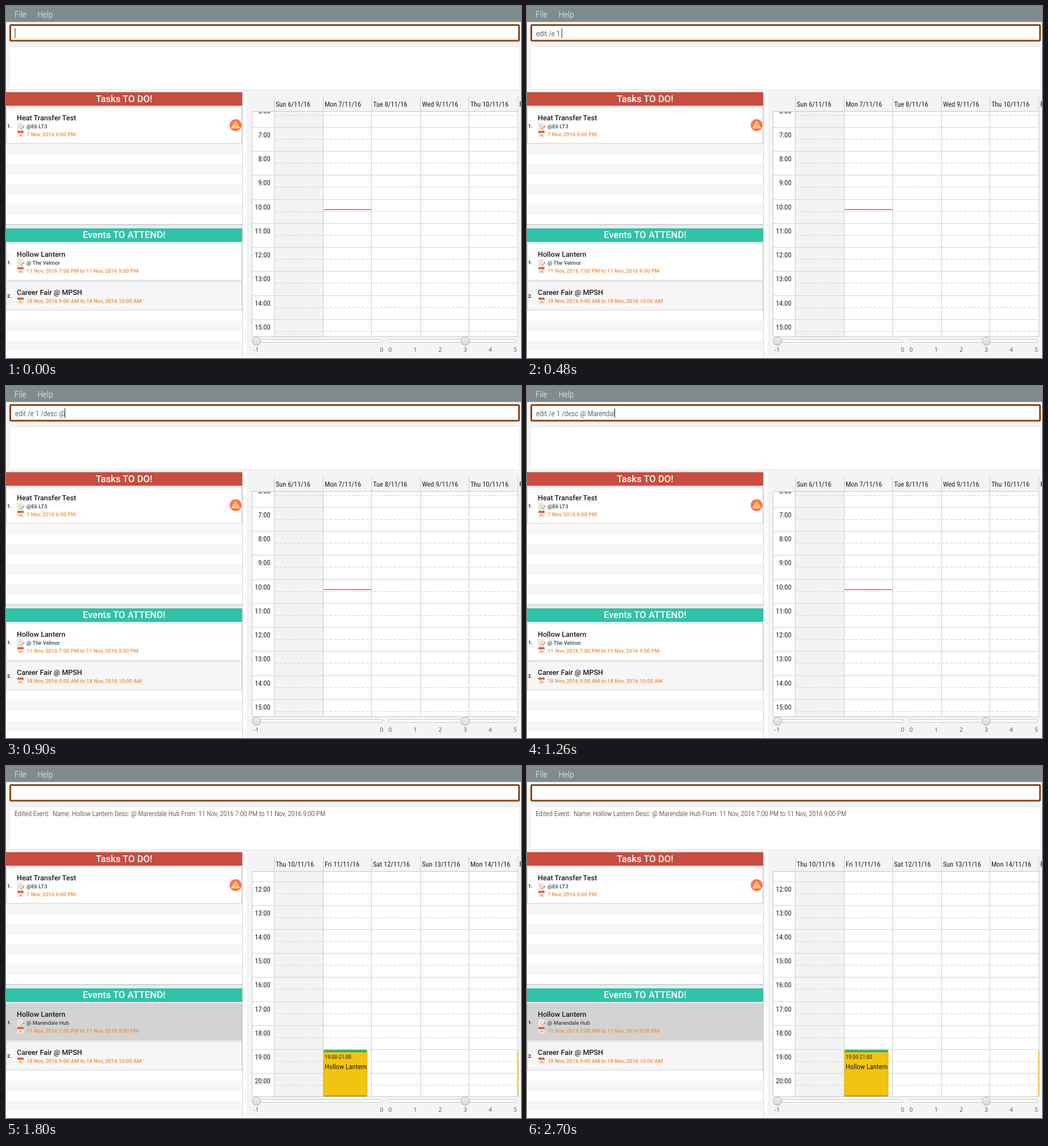
Write an HTML page that moves like this. It is 905 px wide and 619 px high and loops after 3000 ms.

```html
<!DOCTYPE html>
<html lang="en">
<head>
<meta charset="utf-8">
<title>Task planner</title>
<style>
html, body { margin: 0; width: 100%; height: 100%; overflow: hidden; background: #f4f4f4; }
svg { display: block; }
text { font-family: Roboto, sans-serif; white-space: pre; text-rendering: geometricPrecision; }
.cond { font-family: "Roboto Condensed", Roboto, sans-serif; font-stretch: 75%; }
</style>
</head>
<body>
<svg id="stage" width="905" height="619" viewBox="0 0 905 619">
  <defs>
    <clipPath id="gridClip"><rect x="432" y="186" width="469" height="395"/></clipPath>
    <linearGradient id="knob" x2="0" y2="1">
      <stop offset="0" stop-color="#f0f0f0"/><stop offset="1" stop-color="#d8d8d8"/>
    </linearGradient>
  </defs>
</svg>
<script>
const LOOP = 3000, STEP = 60;
const FILM = "Hollow Lantern", MALL = "Marendale Hub";
const SPAN = "11 Nov, 2016 7:00 PM to 11 Nov, 2016 9:00 PM";
const COMMAND = `edit /e 1 /desc @ ${MALL}`;
const stage = document.getElementById("stage");

function el(tag, attrs, parent = stage) {
  const node = document.createElementNS("http://www.w3.org/2000/svg", tag);
  for (const k in attrs) node.setAttribute(k, attrs[k]);
  return parent.appendChild(node);
}
const group = (parent, attrs = {}) => el("g", attrs, parent);
const rect = (x, y, width, height, fill, parent, more = {}) =>
  el("rect", { x, y, width, height, fill, ...more }, parent);
const line = (x1, y1, x2, y2, stroke, parent, more = {}) =>
  el("line", { x1, y1, x2, y2, stroke, ...more }, parent);
const path = (d, fill, parent, more = {}) => el("path", { d, fill, ...more }, parent);

function label(str, x, y, size, fill, parent, more = {}) {
  const node = el("text", { x, y, "font-size": size, fill, ...more }, parent);
  node.textContent = str;
  return node;
}

// Narrow the face when no condensed cut is available.
function narrowScale() {
  const sample = "Sun 6/11/16 10:00";
  const a = label(sample, 0, 0, 100, "none"), b = label(sample, 0, 0, 100, "none", stage, { class: "cond" });
  const ratio = b.getComputedTextLength() / a.getComputedTextLength();
  a.remove();
  b.remove();
  return ratio > 0.95 ? 0.875 : 1;
}
const narrow = narrowScale();

function cond(str, x, y, size, fill, parent, more = {}) {
  return label(str, 0, 0, size, fill, parent,
    { class: "cond", transform: `translate(${x} ${y}) scale(${narrow} 1)`, ...more });
}

function noteIcon(y, parent) {
  const g = group(parent, { transform: `translate(20 ${y})` });
  path("M0 .5H8L10.5 3V12.5H0Z", "#f1ede4", g, { stroke: "#d9d5cc", "stroke-width": .7 });
  path("M2 4H8M2 6.5H8M2 9H6", "none", g, { stroke: "#c5c2ba", "stroke-width": .7 });
  path("M5.5 11.5L11.5 6.5", "none", g, { stroke: "#e9a23b", "stroke-width": 1.6 });
  path("M10.7 7.2L12 6", "none", g, { stroke: "#d9483b", "stroke-width": 1.6 });
}

function calendarIcon(y, parent) {
  const g = group(parent, { transform: `translate(20 ${y})` });
  rect(0, 1, 11, 11, "#f3e8d0", g, { rx: 1 });
  path("M0 4.2V2Q0 1 1 1H10Q11 1 11 2V4.2Z", "#dc5347", g);
  path("M2.5 0V2.2M8.5 0V2.2", "none", g, { stroke: "#77737a", "stroke-width": 1 });
  path("M2 7H9M2 9.5H9", "none", g, { stroke: "#d9c49c", "stroke-width": 1, "stroke-dasharray": "1.5 1.2" });
  rect(4.5, 7.5, 2.2, 2, "#dc7a6a", g);
}

function card(y, height, num, numY, title, desc, date, fill) {
  const g = group(stage);
  const box = rect(.5, y + .5, 414, height, fill, g, { stroke: "#cfcfcf" });
  label(num + ".", 2, numY, 8.5, "#222", g, { "font-weight": 700 });
  label(title, 19, y + 23.7, 12.6, "#1c1c1c", g, { "font-weight": 500 });
  let place = null, base = y + 38.2;
  if (desc) {
    noteIcon(base - 10, g);
    place = label(desc, 36, base, 9.4, "#34495e", g, { "font-weight": 500 });
    base += 13.5;
  }
  calendarIcon(base - 10, g);
  label(date, 36, base, 9.4, "#ef8f36", g, { "font-weight": 500 });
  return { box, place };
}

function heading(str, y, fill) {
  rect(0, y, 415, 24, fill);
  label(str, 207.5, y + 17.3, 16.6, "#fff", stage, { "font-weight": 500, "text-anchor": "middle" });
}

function stripes(y, count) {
  for (let i = 0; i < count; i++) rect(1, y + i * 35.6, 413, 18, "#f6f6f7");
}

function slider(x, width, knobX, ticks) {
  rect(x + .5, 586.5, width, 5, "#fafafa", stage, { rx: 2.5, stroke: "#cbcbcb" });
  el("circle", { cx: knobX, cy: 589.5, r: 7.3, fill: "url(#knob)", stroke: "#ababab" });
  for (const [str, tx] of ticks) {
    label(str, tx, 608, 10.5, "#555", stage, { "text-anchor": "middle", style: "font-family:'Open Sans',sans-serif" });
  }
}

const colX = i => Math.floor(471.5 + 85.6 * i) + .5;

function calendar(days, firstHour, firstY) {
  const g = group(stage);
  days.forEach((d, i) => cond(d, colX(i) + 2.4, 177, 12.4, "#222", g));
  const grid = group(g, { "clip-path": "url(#gridClip)" });
  for (let i = -1; i < 10; i++) {
    const y = Math.floor(firstY + i * 42.22) + .5;
    line(433, y, 900, y, "#d4d4d4", grid);
    line(472, y + 21, 900, y + 21, "#d2d2d2", grid, { "stroke-dasharray": "5 3" });
    cond(firstHour + i + ":00", 464.5, y + 17, 12.4, "#222", grid, { "text-anchor": "end" });
  }
  return { g, grid };
}

// Menu, command box and message area
rect(0, 0, 905, 619, "#f4f4f4");
rect(0, 0, 905, 28, "#7f8c8d");
cond("File", 15, 19.5, 15.2, "#f2f4f4", stage, { "font-weight": 300 });
cond("Help", 55.5, 19.5, 15.2, "#f2f4f4", stage, { "font-weight": 300 });
rect(7.5, 33.5, 894, 27.5, "#fff", stage, { rx: 1.5, stroke: "#8b4513", "stroke-width": 3 });
const typed = cond("", 16, 52.5, 13.2, "#222", stage, { "font-weight": 300 });
const caret = line(0, 39, 0, 56.5, "#222", stage);
rect(6.5, 71.5, 896, 75, "#fff", stage, { rx: 2, stroke: "#ebebeb" });
const message = cond(`Edited Event:  Name: ${FILM} Desc: @ ${MALL} From: ${SPAN}`,
  15, 88, 12.35, "#222", stage, { "font-weight": 300 });

// Task and event lists
rect(0, 151, 416, 468, "#fff");
rect(416, 151, 7, 468, "#fdfdfd");
heading("Tasks TO DO!", 151.5, "#c94c3f");
stripes(242.5, 4);
card(177, 64, 1, 213.5, "Heat Transfer Test", "@E6 LT3", "7 Nov, 2016 6:00 PM", "#fff");
el("circle", { cx: 403.5, cy: 209.5, r: 10.5, fill: "#ff7058" });
path("M403.5 202.5L410.8 214.5H396.2Z", "#ffd15c", stage,
  { stroke: "#fbe3a1", "stroke-width": 1, "stroke-linejoin": "round" });
path("M403.5 206V210.3M403.5 211.6V213", "none", stage, { stroke: "#f08a4b", "stroke-width": 1.4 });
rect(0, 385, 415, 6, "#ececec");
line(0, 384.5, 415, 384.5, "#b5b5b5");
heading("Events TO ATTEND!", 391, "#2fc3a7");
stripes(553.5, 2);
const event = card(416.8, 65, 1, 453.5, FILM, "@ The Velmor", SPAN, "#fff");
card(483.8, 50.5, 2, 513, "Career Fair @ MPSH", "", "18 Nov, 2016 9:00 AM to 18 Nov, 2016 10:00 AM", "#f6f6f8");
line(415.5, 152, 415.5, 619, "#cfcfcf");

// Calendar frame
rect(432, 186, 468, 395, "#fff");
rect(472, 159, 85, 422, "#f2f3f2");
const before = calendar(["Sun 6/11/16", "Mon 7/11/16", "Tue 8/11/16", "Wed 9/11/16", "Thu 10/11/16", "Fri 11/11/16"], 7, 213.5);
line(558, 358, 642, 358, "#f47b70", before.grid, { "stroke-width": 1.8 });
const after = calendar(["Thu 10/11/16", "Fri 11/11/16", "Sat 12/11/16", "Sun 13/11/16", "Mon 14/11/16", "Fri 11/11/16"], 12, 203.1);
for (let i = 0; i < 6; i++) line(colX(i), 159, colX(i), 581, "#cdcdcd");
path("M432.5 581.5V185.5H900.5M432.5 581.5H900.5", "none", stage, { stroke: "#c8c8c8" });

// Booked slot, above the column rules
const slot = group(stage);
rect(558, 499.5, 76.5, 81, "#f1c40f", slot, { rx: 2.5, stroke: "#f5b90a", "stroke-width": 1.5 });
rect(558.5, 499.5, 75.5, 3.7, "#1bae8b", slot, { rx: 1.5 });
rect(559, 579.5, 75, 1.5, "#4fae62", slot);
rect(898.5, 502, 1.8, 78, "#f5b90a", slot);
cond("19:00-21:00", 560, 515.3, 10, "#222", slot);
cond(FILM, 560, 532.5, 12.4, "#222", slot);

slider(432, 229, 440, [["-1", 439.5], ["0", 660]]);
slider(672, 225, 807, [0, 1, 2, 3, 4, 5].map(n => [String(n), 675 + 44 * n]));

// Characters typed over time
const keys = [[0, 0], [480, 10], [540, 10], [600, 11], [900, 17], [1260, 26], [1500, 30], [1560, 31], [LOOP, 31]];
function typedCount(t) {
  const i = keys.findIndex(k => k[0] > t);
  const [t0, n0] = keys[i - 1], [t1, n1] = keys[i];
  return Math.floor(n0 + (n1 - n0) * (t - t0) / (t1 - t0) + 1e-6);
}

const show = (node, on) => node.setAttribute("visibility", on ? "visible" : "hidden");

function draw(ms) {
  const t = Math.floor((ms % LOOP) / STEP) * STEP;
  const sent = t >= 1740, moved = t >= 1800;
  typed.textContent = sent ? "" : COMMAND.slice(0, typedCount(t));
  const x = 16 + (typed.textContent ? typed.getComputedTextLength() * narrow : 0);
  caret.setAttribute("x1", x);
  caret.setAttribute("x2", x);
  show(caret, !sent || (t >= 2100 && t < 2700));
  show(message, sent);
  event.box.setAttribute("fill", sent ? "#d3d3d3" : "#fff");
  event.place.textContent = sent ? "@ " + MALL : "@ The Velmor";
  show(before.g, !moved);
  show(after.g, moved);
  show(slot, moved);
}

const start = performance.now();
function tick() {
  draw(performance.now() - start);
  requestAnimationFrame(tick);
}
tick();
</script>
</body>
</html>
```
